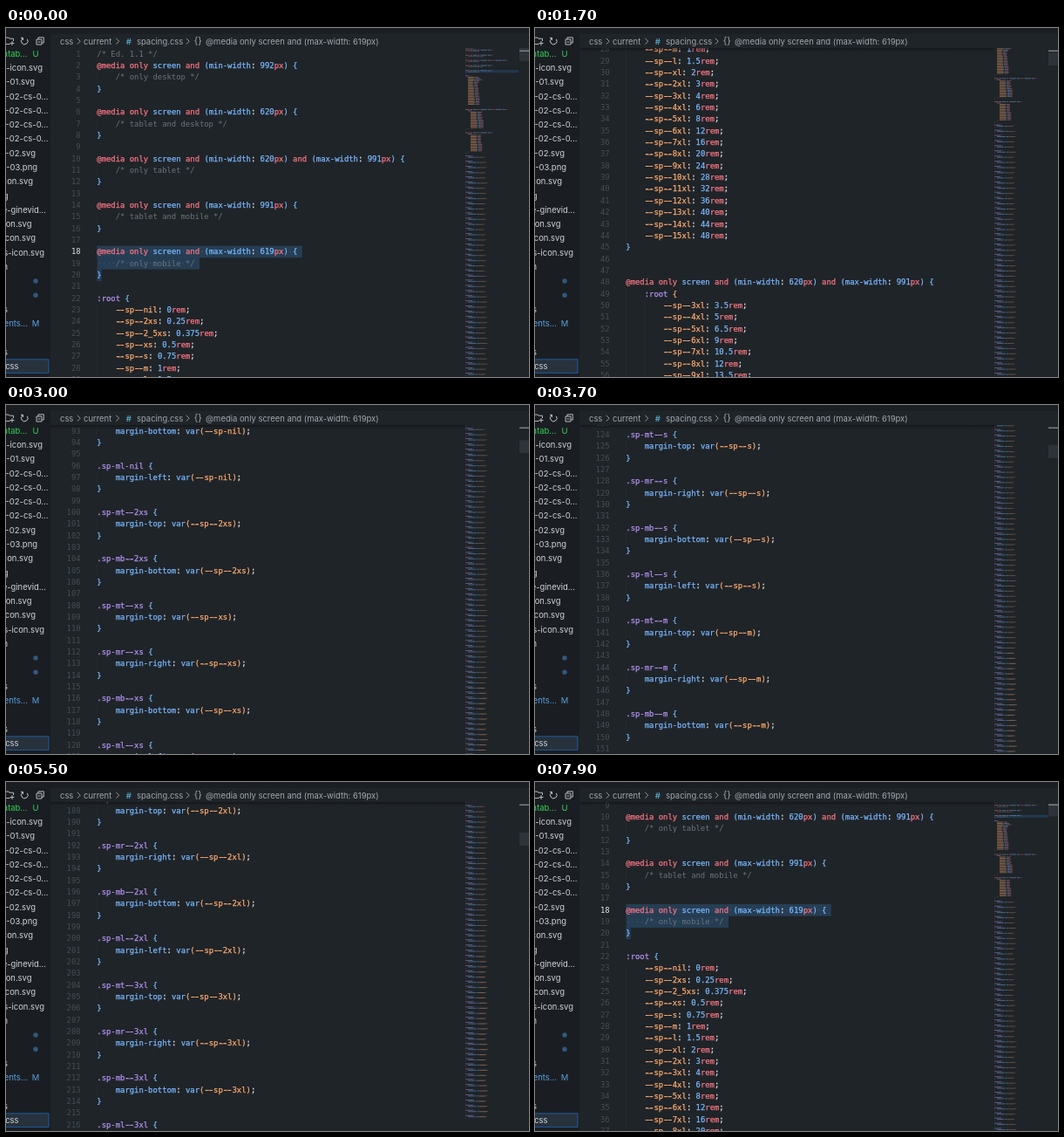
Animation of 600x400 px, one loop 8 s. Source, as an HTML page with a canvas:

```html
<!DOCTYPE html>
<html lang="en">
<head>
<meta charset="utf-8">
<title>Stylesheet scroll</title>
<style>
html, body { margin: 0; width: 100%; height: 100%; overflow: hidden; background: #1f2428; }
canvas { display: block; width: 600px; height: 400px; }
</style>
</head>
<body>
<canvas id="stage"></canvas>
<script>
const canvas = document.getElementById('stage');
const ctx = canvas.getContext('2d');
const ratio = window.devicePixelRatio || 1;
canvas.width = 600 * ratio;
canvas.height = 400 * ratio;

const LOOP = 8000, STEP = 100;
const TOP = 23, LINE = 13.335, CHAR = 5.352, CODE_X = 104.3;
const MINI_X = 527, MINI_LINE = 1.481, MINI_CHAR = 0.741;
const TOTAL = 1937;
const MONO = '8.89px "DejaVu Sans Mono", monospace';
const SANS = '9.45px Inter, sans-serif';
const C = {
  bg: '#1f2428', side: '#1a1e22', text: '#e1e4e8', dim: '#6a737d',
  red: '#f97583', blue: '#79b8ff', orange: '#ffab70', purple: '#b392f0',
  number: '#444d56', guide: '#272d33', select: '#263e54'
};

// ---- document ----

const big = Array.from({ length: 13 }, (_, i) => i + 3 + 'xl');
const small = ['nil', '2xs', '2_5xs', 'xs', 's', 'm', 'l', 'xl', '2xl'];

function vars(names, values, pad) {
  return names.map((n, i) => `${pad}--sp--${n}: ${values[i]}rem;`);
}

function query(cond, values) {
  return [`@media only screen and ${cond} {`, '    :root {',
    ...vars(big, values, '        '), '    }', '}', ''];
}

function rule(side, name, dash = '--') {
  return [`.sp-m${side[0]}${dash}${name} {`, `    margin-${side}: var(--sp${dash}${name});`, '}', ''];
}

function buildLines() {
  const note = (cond, words) => [`@media only screen and ${cond} {`, `    /* ${words} */`, '}', ''];
  const sides = ['top', 'right', 'bottom', 'left'];
  const tablet = '(min-width: 620px) and (max-width: 991px)';
  const out = ['/* Ed. 1.1 */',
    ...note('(min-width: 992px)', 'only desktop'),
    ...note('(min-width: 620px)', 'tablet and desktop'),
    ...note(tablet, 'only tablet'),
    ...note('(max-width: 991px)', 'tablet and mobile'),
    ...note('(max-width: 619px)', 'only mobile'),
    ':root {',
    ...vars([...small, ...big], [0, 0.25, 0.375, 0.5, 0.75, 1, 1.5, 2, 3,
      4, 6, 8, 12, 16, 20, 24, 28, 32, 36, 40, 44, 48], '    '),
    '}', '', '',
    ...query(tablet, [3.5, 5, 6.5, 9, 10.5, 12, 13.5, 15.5, 17.5, 19.5, 21.5, 23.5, 25.5]),
    ...query('(max-width: 619px)', [3, 4, 5, 6, 7, 9, 11, 13, 15, 17, 19, 21, 23])];
  sides.forEach(s => out.push(...rule(s, 'nil', '-')));
  out.push(...rule('top', '2xs'), ...rule('bottom', '2xs'));
  [...small.slice(3), ...big].forEach(n => sides.forEach(s => out.push(...rule(s, n))));
  return out;
}

let depth = 0;
function colorOf(word) {
  const pairs = [C.blue, C.orange, C.purple];
  if (/[{(]/.test(word)) return pairs[depth++ % 3];
  if (/[})]/.test(word)) return pairs[--depth % 3];
  if (/^(@media|only|and|rem|px)$/.test(word)) return C.red;
  if (word.startsWith('--')) return C.orange;
  if (/^(\.sp|:root)/.test(word)) return C.purple;
  return /^[:;]$/.test(word) ? C.text : C.blue;
}

function tokenize(line) {
  const indent = line.search(/\S/);
  if (line.includes('/*')) return [{ col: indent, word: line.trim(), color: C.dim }];
  const parts = line.matchAll(/@media|:root|\.sp[\w-]+|--[\w-]+|\d[\d.]*|[a-z][a-z-]*|[{}():;]/g);
  return Array.from(parts, p => ({ col: p.index, word: p[0], color: colorOf(p[0]) }));
}

const lines = buildLines();
const tokens = lines.map(tokenize);

// Indent levels that carry a guide on each line
const guides = lines.map(l => l ? Math.floor(l.search(/\S/) / 4) : 0);

// ---- motion ----

const keys = [[1000, 0], [2200, 56.33], [3700, 122.68], [4800, 170.77],
  [5450, 188], [6400, 140.45], [7900, 8.22]];
const slopes = keys.slice(1).map((k, i) => (k[1] - keys[i][1]) / (k[0] - keys[i][0]));
const tangents = keys.map((_, i) => {
  if (i === 0) return 0;
  if (i === keys.length - 1) return slopes[i - 1];
  const a = slopes[i - 1], b = slopes[i];
  return a * b <= 0 ? 0 : 2 * a * b / (a + b);
});

function scrollAt(t) {
  if (t <= keys[0][0]) return 0;
  const last = keys.length - 1;
  if (t >= keys[last][0]) return keys[last][1];
  const i = keys.findIndex(k => k[0] > t) - 1;
  const [t0, a] = keys[i], [t1, b] = keys[i + 1];
  const span = t1 - t0, u = (t - t0) / span, v = 1 - u;
  return a * v * v * (1 + 2 * u) + b * u * u * (3 - 2 * u)
    + span * u * v * (tangents[i] * v - tangents[i + 1] * u);
}

// ---- drawing ----

function box(x, y, w, h, color) {
  ctx.fillStyle = color;
  ctx.fillRect(x, y, w, h);
}

function label(str, x, y, color, align = 'left') {
  ctx.fillStyle = color;
  ctx.textAlign = align;
  ctx.fillText(str, x, y);
}

function stroke(color, width, draw) {
  ctx.strokeStyle = color;
  ctx.lineWidth = width;
  ctx.beginPath();
  draw();
  ctx.stroke();
}

function poly(...pts) {
  pts.forEach(([x, y], i) => i ? ctx.lineTo(x, y) : ctx.moveTo(x, y));
}

function drawSelection(i, y) {
  const line = lines[i];
  const width = (line.length + (i < 19 ? 1 : 0)) * CHAR;
  box(CODE_X, y, width, LINE + 0.2, C.select);
  for (let c = 0; c < line.length; c++) {
    if (line[c] === ' ') box(CODE_X + (c + 0.4) * CHAR, y + 6.3, 1, 1, '#4b6075');
  }
}

// Code text, slightly thickened; a double dash joins into one bar
function drawToken({ col, word, color }, base) {
  const x = CODE_X + col * CHAR;
  label(word, x, base, color);
  if (color === C.dim) return;
  ctx.strokeStyle = color;
  ctx.lineWidth = 0.25;
  ctx.strokeText(word, x, base);
  for (const dash of word.matchAll(/--/g)) {
    box(x + (dash.index + 0.2) * CHAR, base - 2.8, 1.6 * CHAR, 0.8, color);
  }
}

function drawCode(scroll) {
  ctx.save();
  ctx.beginPath();
  ctx.rect(51, TOP, 476, 400 - TOP);
  ctx.clip();
  ctx.font = MONO;
  const first = Math.floor(scroll);
  for (let i = first; i < first + 30; i++) {
    const y = TOP + (i - scroll) * LINE;
    if (i >= 17 && i <= 19) drawSelection(i, y);
    for (let g = 0; g < guides[i]; g++) box(CODE_X + g * 4 * CHAR, y, 0.75, LINE, C.guide);
    label(i + 1, 85.6, y + 9.7, i === 17 ? C.text : C.number, 'right');
    tokens[i].forEach(k => drawToken(k, y + 9.7));
  }
  if (scroll > 0) {
    const shade = ctx.createLinearGradient(0, TOP, 0, TOP + 4);
    shade.addColorStop(0, 'rgba(0,0,0,.35)');
    shade.addColorStop(1, 'rgba(0,0,0,0)');
    box(51, TOP, 476, 4, shade);
  }
  ctx.restore();
}

function drawMinimap(scroll) {
  const rows = (400 - TOP) / MINI_LINE, view = (400 - TOP) / LINE;
  const first = Math.floor(scroll * (1 - (rows - view) / (TOTAL - view)));
  for (let i = first; i < first + rows && i < lines.length; i++) {
    const y = TOP + (i - first) * MINI_LINE;
    if (i === 17 || i === 18) box(MINI_X, y, 61, MINI_LINE, '#213c55');
    for (const k of tokens[i]) {
      const faint = i > 82 && i < 283 && k.color === C.orange;
      ctx.globalAlpha = faint ? 0.3 : 0.45;
      const height = /^[:;{}()]$/.test(k.word) ? 0.6 : 1;
      box(MINI_X + k.col * MINI_CHAR, y + 0.3, k.word.length * MINI_CHAR, height, k.color);
    }
    ctx.globalAlpha = 1;
  }
  box(589, TOP + scroll * 0.187, 11, 14.8, '#2d3339');
  box(589, 25.6, 11, 1.2, '#8d949b');
}

const files = [
  ['-icon.svg', 42], ['-01.svg', 33], ['-02-cs-0...', 48.5], ['-02-cs-0...', 48.5],
  ['-02-cs-0...', 48.5], ['-02-cs-0...', 48.5], ['-02.svg', 34], ['-03.png', 36],
  ['con.svg', 31], ['g', 2.5], ['e-ginevid...', 46], ['con.svg', 29.5], ['con.svg', 34],
  ['s-icon.svg', 44], ['n', 2], null, null, ['s', 2], null, null, ['s', 2], ['css', 14.5]
];

function drawSidebar() {
  box(0, 0, 51, 400, C.side);
  ctx.font = SANS;
  const rowY = r => 29.5 + r * 16.28;
  box(0, rowY(22) - 8.1, 49.5, 16.2, '#28323d');
  stroke('#1a5ea8', 0.9, () => ctx.rect(-2, rowY(22) - 7.8, 51, 15.6));
  files.forEach((f, i) => f && label(f[0], f[1], rowY(i + 1) + 3.3, '#d1d5da', 'right'));
  label('atab...', 24.5, rowY(0) + 3.3, '#34d058', 'right');
  label('U', 34, rowY(0) + 3.3, '#34d058', 'center');
  label('ents...', 25, rowY(19) + 3.3, '#5a9fe0', 'right');
  label('M', 34, rowY(19) + 3.3, '#5a9fe0', 'center');
  for (const r of [16, 17]) {
    ctx.fillStyle = '#325880';
    ctx.beginPath();
    ctx.arc(34, rowY(r), 2.7, 0, 7);
    ctx.fill();
  }
}

function drawIcons() {
  const ink = '#c5cad0';
  stroke(ink, 0.9, () => {
    poly([0, 11], [3, 11], [4, 12.2], [8.5, 12.2], [8.5, 15]);
    poly([0, 18.5], [4.5, 18.5]);
    poly([7, 15], [7, 20]);
    poly([4.5, 17.5], [9.5, 17.5]);
  });
  stroke(ink, 1, () => {
    ctx.arc(21.3, 15, 3.8, -0.6, 4.1);
    poly([17, 11.3], [19.5, 11.3], [19.5, 13.8]);
  });
  stroke(ink, 0.9, () => {
    ctx.rect(35, 13, 6, 6);
    poly([37, 13], [37, 10.8], [43.3, 10.8], [43.3, 17], [41, 17]);
    poly([36.5, 16], [39.5, 16]);
  });
}

function drawBreadcrumb() {
  box(51, 0, 549, 7, '#1b1f23');
  ctx.font = SANS;
  const ink = '#a0a7ae', y = 18.6;
  label('css', 62, y, ink);
  label('current', 89, y, ink);
  label('spacing.css', 150, y, ink);
  label('@media only screen and (max-width: 619px)', 229, y, ink);
  ctx.font = '10.5px Inter, sans-serif';
  label('{}', 220.3, y - 0.4, ink, 'center');
  ctx.font = 'bold ' + SANS;
  label('#', 140.7, y, '#519aba', 'center');
  for (const x of [83.5, 128, 208.5]) {
    stroke(ink, 0.9, () => poly([x - 1.7, 11.8], [x + 1.7, 15.2], [x - 1.7, 18.6]));
  }
}

function draw(now) {
  const t = Math.floor((now % LOOP) / STEP) * STEP;
  const scroll = scrollAt(t);
  ctx.setTransform(ratio, 0, 0, ratio, 0, 0);
  box(0, 0, 600, 400, C.bg);
  drawCode(scroll);
  drawMinimap(scroll);
  drawBreadcrumb();
  drawSidebar();
  drawIcons();
}

const start = performance.now();
function tick() {
  draw(performance.now() - start);
  requestAnimationFrame(tick);
}
tick();
</script>
</body>
</html>
```
